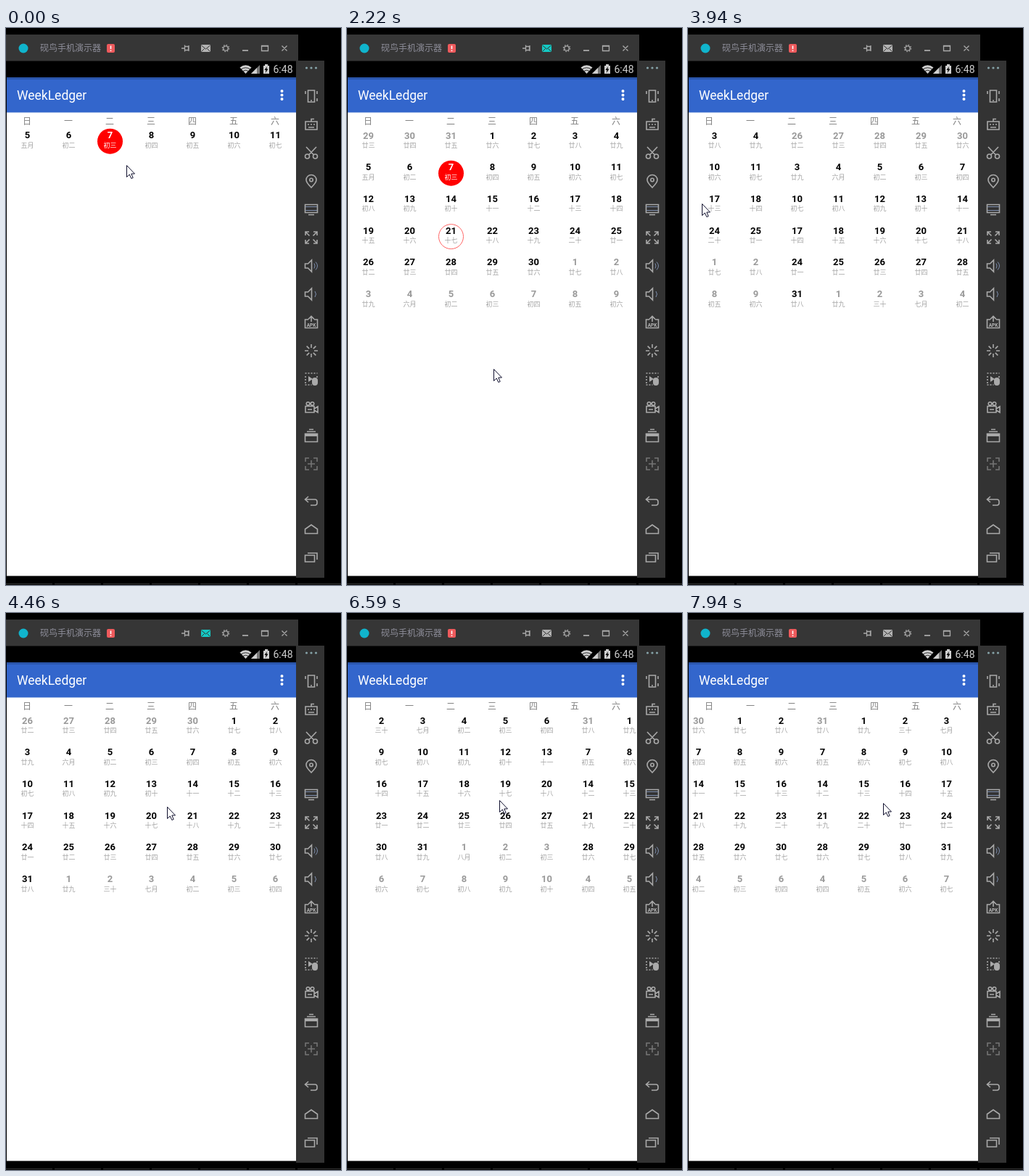
Recreate the animation shown at these times as an HTML page. Size 462 px wide and 768 px high, loop 8 s.

```html
<!DOCTYPE html>
<html lang="zh">
<head>
<meta charset="utf-8">
<title>Calendar</title>
<style>
html, body { margin: 0; width: 100%; height: 100%; overflow: hidden; background: #000; }
svg { display: block; width: 462px; height: 768px; }
text { font-family: Roboto, "Noto Sans CJK SC", "Noto Sans CJK", sans-serif; }
.mid { text-anchor: middle; }
.day { font-size: 13px; font-weight: 700; }
.lunar { font-size: 9px; font-weight: 300; fill: #a2a2a2; }
.line { fill: none; stroke: #a9a9a9; stroke-width: 1.6; }
</style>
</head>
<body>
<svg viewBox="0 0 462 768" xmlns="http://www.w3.org/2000/svg">
  <defs>
    <clipPath id="window"><rect id="windowRect" x="1" y="138" width="399" height="44"/></clipPath>
  </defs>
  <rect width="462" height="768" fill="#000"/>
  <rect y="9" width="403" height="36.5" fill="#363636"/>
  <rect x="400" y="45" width="39" height="713" fill="#333"/>
  <path d="M0 766.5H462" stroke="#3a3a3a" stroke-dasharray="64 3"/>

  <circle cx="24" cy="28" r="6.5" fill="#10b4cc"/>
  <text x="47" y="32" font-size="12" fill="#8e8e9a">砚鸟手机演示器</text>
  <rect x="139" y="22" width="11" height="12" rx="2" fill="#ee5a5c"/>
  <path d="M144.5 24.5v4.5m0 1.5v1.500" stroke="#fff" stroke-width="1.6"/>

  <g class="line" style="stroke-width:1.3">
    <path d="M242 28h4M246.5 23.500v9M247 25.500h4.500v5H247M252 24v8"/>
    <circle cx="303" cy="28" r="3.2"/>
    <circle cx="303" cy="28" r="4.6" stroke-dasharray="1.6 2.01"/>
    <path d="M326 31h8" style="stroke-width:1.8"/>
    <path d="M352.5 24.500h9v7h-9zM352 25h10M380.500 24.500l7 7m0-7l-7 7"/>
  </g>
  <rect id="mail" x="269" y="23" width="13" height="10" rx="1"/>
  <path d="M269.5 24l6 5 6-5M269.500 32.500l4-4M281.500 32.500l-4-4" fill="none" stroke="#363636"/>

  <g fill="#d0d0d0">
    <path d="M322.5 54.500Q330.500 48 338.500 54.500L330.500 63Z"/>
    <path d="M324 57q6.500-4.500 13 0M326.500 59.500q4-2.500 8 0" fill="none" stroke="#000" stroke-width=".8"/>
    <path d="M338 63L350 51V63Z" fill="#777"/>
    <path d="M338 63l8-8v8z"/>
    <path d="M355 52h2v-2h4v2h2v11h-8z"/>
    <path d="M360 53l-3.500 5h2l-.8 4 3.800-5.500h-2.200z" fill="#000"/>
    <text x="368.5" y="62" font-size="14">6:48</text>
  </g>

  <rect x="1" y="68" width="399" height="49" fill="#3366cc"/>
  <rect x="1" y="68" width="399" height="3" fill="#2b56ac"/>
  <text x="15" y="99" font-size="17.5" fill="#fff">WeekLedger</text>
  <g fill="#fff">
    <circle cx="380.5" cy="87" r="2"/><circle cx="380.5" cy="92.5" r="2"/><circle cx="380.5" cy="98" r="2"/>
  </g>
  <rect x="1" y="116.5" width="399" height="639" fill="#fff"/>
  <g id="weekdays" font-size="12" font-weight="500" fill="#808080"></g>
  <g clip-path="url(#window)"><g id="strips"></g></g>
  <g id="tools"></g>
  <path id="cursor" d="M.5 .5V16.500L4.300 13L6.800 18.500L9.200 17.500L6.800 12H11.500Z" fill="#fff" stroke="#10102e"/>
</svg>
<script>
const LOOP = 8000, REFRESH = 60, PAGE = 399, COL = 57, ROW = 43.7;
const $ = id => document.getElementById(id);

function add(parent, tag, attrs, content) {
  const el = document.createElementNS('http://www.w3.org/2000/svg', tag);
  for (const key in attrs) el.setAttribute(key, attrs[key]);
  if (content !== undefined) el.textContent = content;
  parent.appendChild(el);
  return el;
}

// Eased progress from 0 to 1, clamped at both ends
function ease(t, start, span) {
  const u = Math.min(1, Math.max(0, (t - start) / span));
  return u * u * (3 - 2 * u);
}

// Calendar
const DAY_MS = 864e5, LUNATION = 29.4;
const date = (month, day) => new Date(Date.UTC(2016, month - 1, day));
const newMoon = date(5, 7);

function lunarName(when) {
  const days = (when - newMoon) / DAY_MS;
  const moon = Math.floor((days + 0.99) / LUNATION);
  const n = days - Math.floor(moon * LUNATION);
  if (n === 0) return '四五六七八'[moon] + '月';
  if (n === 19) return '二十';
  if (n === 29) return '三十';
  return '初十廿'[Math.floor(n / 10)] + '一二三四五六七八九十'[n % 10];
}

function drawMonth(parent, month, left) {
  const page = add(parent, 'g', { transform: `translate(${left} 0)` });
  const first = date(month, 1);
  for (let i = 0; i < 42; i++) {
    const when = new Date(+first + (i - first.getUTCDay()) * DAY_MS);
    const day = when.getUTCDate(), inside = when.getUTCMonth() === month - 1;
    const x = 29.5 + i % 7 * COL, y = 148 + Math.floor(i / 7) * ROW;
    const today = month === 6 && inside && day === 7;
    if (today) add(page, 'circle', { cx: x, cy: y + 8.5, r: 17.5, fill: '#f00' });
    if (month === 6 && inside && day === 21)
      add(page, 'circle', { cx: x, cy: y + 8.5, r: 17, fill: 'none', stroke: '#f66' });
    add(page, 'text', { class: 'mid day', x, y: Math.round(y + 4.5), fill: today ? '#fff' : inside ? '#000' : '#999' }, day);
    add(page, 'text', { class: 'mid lunar', x, y: Math.round(y + 17), style: today ? 'fill:#fff' : '' }, lunarName(when));
  }
}

[...'日一二三四五六'].forEach((name, i) =>
  add($('weekdays'), 'text', { class: 'mid', x: 29 + i * COL, y: 132.5 }, name));

const swipes = [
  { months: [6, 7], start: 3360, span: 851 },
  { months: [7, 8], start: 5160, span: 593 },
  { months: [8, 8], start: 6210, span: 1032 },
  { months: [7, 8], start: 7700, span: 515, back: true }
];
for (const swipe of swipes) {
  swipe.strip = add($('strips'), 'g', {});
  swipe.months.forEach((month, i) => drawMonth(swipe.strip, month, i * PAGE));
}

// Where the hand turns or rests: [time, x, y]
const turns = [
  [0, 166, 189], [540, 167, 182], [960, 168, 222], [1920, 200, 458], [2220, 202, 470],
  [2880, 269, 250], [3180, 289, 250], [3900, 19, 242], [4440, 222, 267], [4860, 281, 254],
  [5040, 275, 254], [5700, 39, 262], [6120, 276, 258], [7140, 98, 259], [7560, 84, 246],
  [7920, 269, 262], [LOOP, 269, 262]
];

function pointerAt(t) {
  const i = turns.findIndex(turn => turn[0] > t);
  const [t0, x0, y0] = turns[i - 1], [t1, x1, y1] = turns[i];
  const k = ease(t, t0, t1 - t0);
  return [x0 + (x1 - x0) * k, y0 + (y1 - y0) * k];
}

// Side toolbar, top to bottom
const ring = (x, y, r) => `M${x - r} ${y}a${r} ${r} 0 1 0 ${2 * r} 0a${r} ${r} 0 1 0 ${-2 * r} 0`;
const corners = 'M-8-3v-5h5M3-8h5v5M8 3v5h-5M-3 8h-5v-5';
const speaker = 'M-8.5-3h4l5-5v16l-5-5h-4z';
const rays = Array.from({ length: 8 }, (_, i) => {
  const c = Math.cos(i * Math.PI / 4), s = Math.sin(i * Math.PI / 4);
  return `M${4 * c} ${4 * s}L${9 * c} ${9 * s}`;
}).join('');
const tools = [
  { line: 'M-4.5-8h9v16h-9zM-1 6h2M-8-7v4M8-7v4M8 3v4' },
  { line: 'M-8-4h16v11h-16zM0-4v-3.500h4M-5 0h2M-1 0h2M3 0h2M-4 4h8' },
  { line: ring(-5.5, 5, 3) + ring(5.5, 5, 3) + 'M-7-8L3.500 3M7-8L-3.500 3' },
  { line: 'M0 9C-4 5-7 2-7-1.500a7 7 0 0 1 14 0C7 2 4 5 0 9z' + ring(0, -1.5, 2.2) },
  { line: 'M-8.5-6.500h17v11h-17zM-4 7.500h8', thin: 'M-8-3.500h16M-8 1.500h16' },
  { line: corners + 'M-8-8l5.500 5.500M8-8l-5.500 5.500M8 8l-5.500-5.500M-8 8l5.500-5.500' },
  { line: speaker, thin: 'M4-3.500q2 3.500 0 7M6-5.500q5 5.500 0 11' },
  { line: speaker, thin: 'M5-4q3 4 0 8' },
  { line: 'M-4-4h-4.500v11.500h17v-11.500h-4.500M0-1v-7M-4-4.500l4-4 4 4', label: 'APK' },
  { line: rays },
  { dots: 'M-8.5-8h17M-8.500 8h9M-8-4v12M8-4v3', fill: 'M-4-4l6 4-6 4zM1 2a4 4 0 0 1 8 0v3a4 4 0 0 1-8 0z' },
  { line: ring(-4.5, -5, 2.3) + ring(1.5, -5, 2.3) + 'M-8-1.500h12v8.500h-12zM4 2l5-3v8l-5-3M-5 3h6' },
  { line: 'M-3-8.500h6M-6-5.500h12M-8.500-2.500h17v11h-17z', fill: 'M-8-2h16v3h-16z' },
  { line: corners + 'M0-5v10M-5 0h10', dim: true },
  { line: 'M-4-6l-4.500 4 4.500 4M-8-2h13q3 0 3 3v2q0 3-3 3h-6', low: true },
  { line: 'M-8.5 0L0-6 8.500 0V6h-17z', low: true },
  { line: 'M-8.5-3h13v9h-13zM-5-6h13v9', low: true }
];
tools.forEach((tool, i) => {
  const y = 94 + 39 * i + (tool.low ? 12 : 0);
  const icon = add($('tools'), 'g', { transform: `translate(421 ${y})`, opacity: tool.dim ? 0.55 : 1 });
  if (tool.line) add(icon, 'path', { class: 'line', d: tool.line });
  if (tool.dots) add(icon, 'path', { class: 'line', d: tool.dots, 'stroke-dasharray': '2 2' });
  if (tool.thin) add(icon, 'path', { d: tool.thin, fill: 'none', stroke: '#7f8fae' });
  if (tool.fill) add(icon, 'path', { d: tool.fill, fill: '#a9a9a9' });
  if (tool.label) add(icon, 'text', { class: 'mid', y: 5.5, 'font-size': 6.5, 'font-weight': 700, fill: '#b5b5b5' }, tool.label);
});
for (const dx of [-6.5, 0, 6.5]) add($('tools'), 'circle', { cx: 421 + dx, cy: 55, r: 1.6, fill: '#86a3a8' });

function render(time) {
  const t = Math.floor(time / REFRESH) * REFRESH;
  const [x, y] = pointerAt(t);
  $('cursor').setAttribute('transform', `translate(${Math.round(x)} ${Math.round(y)})`);

  const lit = t > 90 && (t - 90) % 1330 < 850;
  $('mail').setAttribute('fill', lit ? '#14c9c4' : '#b2b2b2');

  // Pulling down unfolds the week into the whole month
  const open = ease(t, 960, 960);
  $('windowRect').setAttribute('height', 44 + 220 * open);

  const current = swipes.filter(s => s.start <= t).pop() || swipes[0];
  for (const s of swipes) s.strip.setAttribute('display', s === current ? 'inline' : 'none');
  const k = ease(t, current.start, current.span);
  const offset = -PAGE * (current.back ? 1 - k : k);
  current.strip.setAttribute('transform', `translate(${Math.round(offset)} ${Math.round(-ROW * (1 - open))})`);
}

function tick() {
  render(performance.now() % LOOP);
  requestAnimationFrame(tick);
}
tick();
</script>
</body>
</html>
```
